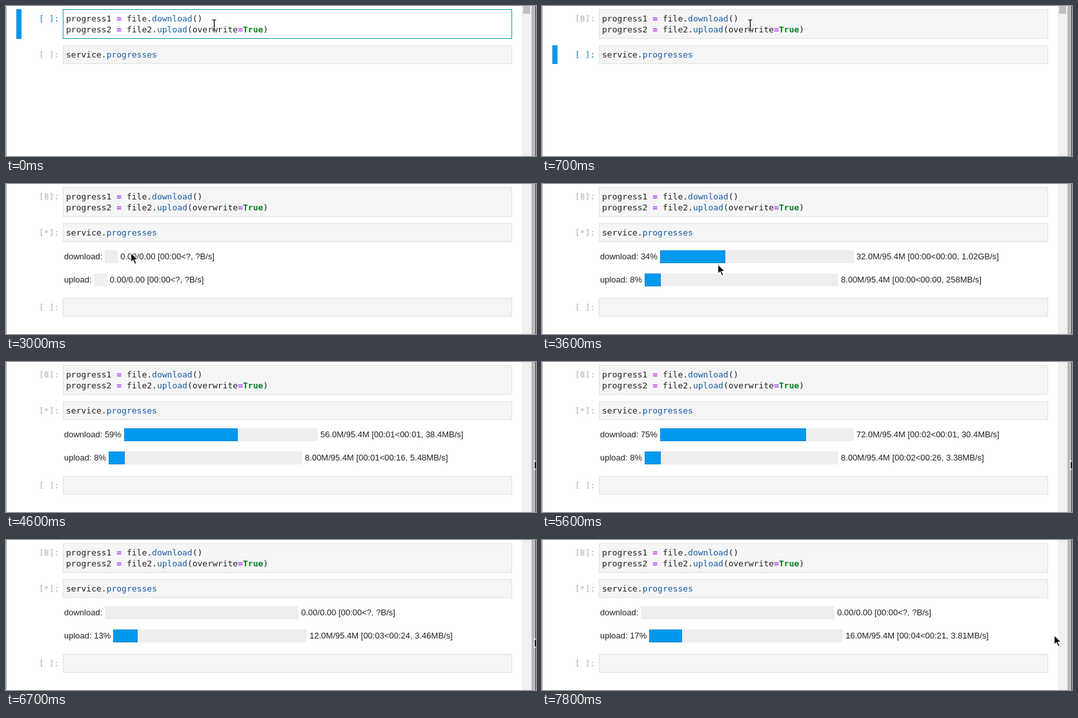
An HTML page for the animation above (8000 ms loop, 821 px wide and 233 px high).

```html
<!DOCTYPE html>
<html lang="en">
<head>
<meta charset="utf-8">
<title>Notebook progress bars</title>
<style>
  html, body { margin: 0; width: 100%; height: 100%; overflow: hidden; background: #fff; }
  #stage { position: relative; width: 821px; height: 233px; overflow: hidden; background: #fff; }
  #stage > * { position: absolute; box-sizing: border-box; }
  .edge { left: 0; top: 0; width: 1px; height: 233px; background: #a9a9a9; }
  .track { left: 799px; top: 0; width: 15px; height: 233px; background: #f0f0f0; }
  .thumb { left: 801px; top: 0; width: 11px; height: 12px; background: #c1c1c1; }
  .gutter { left: 814px; top: 0; width: 7px; height: 233px; background: #b9b9b9; border-right: 1px solid #3c3c3c; }
  .mark { left: 16px; width: 8px; background: #0399ea; border: 1px solid #0690dc; }
  .code, .prompt { font: 13px/17px "DejaVu Sans Mono", monospace; white-space: pre; color: #212121; }
  .code { left: 88px; width: 696px; padding: 5px 4px; border: 1px solid #e0e0e0; background: #f5f5f5; }
  .code.edit { background: #fff; border-color: #0e97b0; }
  .prompt { left: 51px; color: #b0b0b0; }
  .prompt.active { color: #2583ae; }
  .code b { color: #aa22ff; }
  .code b.k { color: #067c20; }
  .code i { font-style: normal; color: #155ba2; }
  .caret { left: 265px; top: 28px; width: 1px; height: 17px; background: #000; }
  .row { left: 90px; display: flex; gap: 4px; height: 20px; white-space: pre;
         font: 13px/20px "Liberation Sans", Arial, sans-serif; color: #212121; }
  .bar { flex: none; height: 20px; background: #eee; }
  .fill { height: 20px; background: #0099ee; box-shadow: inset 0 0 0 1px #0a88d6; }
  svg { left: 0; top: 0; overflow: visible; }
</style>
</head>
<body>
<div id="stage">
  <div class="edge"></div>
  <div class="track"></div>
  <div class="thumb" id="thumb"></div>
  <div class="gutter"></div>
  <div class="mark" id="mark"></div>

  <div class="prompt" id="p1" style="top:11px"></div>
  <div class="code" id="c1" style="top:5px;height:46px">progress1 <b>=</b> file.<i>download</i>()
progress2 <b>=</b> file2.<i>upload</i>(overwrite<b>=</b><b class="k">True</b>)</div>
  <div class="prompt" id="p2" style="top:67px"></div>
  <div class="code" style="top:61px;height:29px">service.<i>progresses</i></div>
  <div class="prompt" id="p3">[ ]:</div>
  <div class="code" id="c3" style="height:29px"></div>
  <div class="caret" id="caret"></div>

  <div class="row" id="down" style="top:103px"><span></span><div class="bar"><div class="fill"></div></div><span></span></div>
  <div class="row" id="up" style="top:139px"><span></span><div class="bar"><div class="fill"></div></div><span></span></div>

  <svg id="beam" width="11" height="21" fill="none">
    <path d="M2.5 2.5h2l1 1 1-1h2M5.5 3v15M2.5 18.5h2l1-1 1 1h2" stroke="#fff" stroke-width="2.4"/>
    <path d="M2.5 2.5h2l1 1 1-1h2M5.5 3v15M2.5 18.5h2l1-1 1 1h2" stroke="#000" stroke-width="1.2"/>
  </svg>
  <svg id="arrow" width="13" height="20">
    <path d="M.5 .8V15.6L4 12.4l2.6 6 2.5-1.1-2.6-5.8h4.9Z" fill="#111" stroke="#fff" stroke-width="1.1"/>
  </svg>
</div>
<script>
const LOOP = 8000, STEP = 100, TOTAL = 95.367, BAR = 300, CHUNK = 4;
const START = 3200, DONE = 6700;
const $ = id => document.getElementById(id);

// key points: time, then values
const received = [[3500, 32], [4400, 52], [4600, 56], [5300, 64], [6000, 84], [6500, 88]];
const elapsed = [[START, 0.0307], [4600, 1.459], [6000, 2.734], [7400, 4.2]];
const pointer = [
  [2700, 318, 28], [3000, 193, 106], [3600, 272, 124], [4400, 704, 136],
  [4600, 818, 152], [7100, 818, 152], [7600, 802, 150], [7800, 793, 147]
];

// linear interpolation of column n, held at both ends
function at(keys, t, n = 1) {
  const i = keys.findIndex(k => k[0] > t);
  if (i < 0) return keys[keys.length - 1][n];
  if (i === 0) return keys[0][n];
  const a = keys[i - 1], b = keys[i];
  return a[n] + (b[n] - a[n]) * (t - a[0]) / (b[0] - a[0]);
}

// data arrives in whole chunks
function downloaded(t) {
  if (t < START || t >= DONE) return 0;
  return Math.floor(at(received, t) / CHUNK) * CHUNK;
}
function uploaded(t) {
  return t < START ? 0 : t < 6000 ? 8 : t < 7400 ? 12 : 16;
}

// the readout refreshes only when a chunk arrives
function refreshed(t) {
  const state = s => downloaded(s) + "/" + uploaded(s);
  let s = t;
  while (s > START && state(s - STEP) === state(t)) s -= STEP;
  return s;
}

function size(v) {
  return v < 9.995 ? v.toFixed(2) : v < 99.95 ? v.toFixed(1) : v.toFixed(0);
}
function rate(v) {
  return v >= 999.5 ? size(v / 1024) + "GB/s" : size(v) + "MB/s";
}
function clock(s) {
  return "00:" + String(s).padStart(2, "0");
}

function showRow(id, name, done, secs, width, filled = done) {
  const [label, bar, info] = $(id).children;
  const speed = done / secs;
  label.textContent = name + ":" + (done ? " " + Math.round(100 * done / TOTAL) + "%" : "");
  bar.style.width = width + "px";
  bar.firstChild.style.width = width * filled / TOTAL + "px";
  info.textContent = done
    ? `${size(done)}M/95.4M [${clock(Math.floor(secs))}<${clock(Math.round((TOTAL - done) / speed))}, ${rate(speed)}]`
    : "0.00/0.00 [00:00<?, ?B/s]";
}

function drawProgress(t) {
  const down = downloaded(t);
  const secs = at(elapsed, refreshed(t));
  const width = t < START ? 20 : BAR;
  // the last chunk fills the bar just before its text appears
  const filled = t >= 6300 && down ? 88 : down;
  showRow("down", "download", down, secs, width, filled);
  showRow("up", "upload", uploaded(t), secs + 0.0003, width);
}

function show(id, on) {
  $(id).style.visibility = on ? "visible" : "hidden";
}
function move(id, x, y) {
  $(id).style.transform = `translate(${x}px, ${y}px)`;
}

function drawPointer(t) {
  const moving = t >= 2700;
  const x = moving ? Math.round(at(pointer, t, 1)) : 322;
  const y = moving ? Math.round(at(pointer, t, 2)) : 29;
  const overCode = y < 51;
  show("beam", overCode && (moving || t < 2300));
  show("arrow", !overCode);
  move("beam", x - 5, y - 10);
  move("arrow", x, y);
}

function setPrompt(id, text, active) {
  $(id).textContent = `[${text}]:`;
  $(id).classList.toggle("active", active);
}

function draw(time) {
  const t = Math.floor(time / STEP) * STEP;
  const first = t < 700, ran = t >= 1900, busy = t >= 2100;

  $("c1").classList.toggle("edit", first);
  setPrompt("p1", first ? " " : "8", first);
  setPrompt("p2", ran ? "*" : " ", !first && !ran);
  show("caret", t >= 100 && first);
  show("thumb", !ran);
  show("mark", !ran);
  $("mark").style.top = first ? "5px" : "61px";
  $("mark").style.height = first ? "46px" : "29px";

  const top = busy ? 177 : 100;
  $("c3").style.top = top + "px";
  $("p3").style.top = top + 6 + "px";
  show("c3", ran);
  show("p3", ran);

  show("down", busy);
  show("up", busy);
  if (busy) drawProgress(t);
  drawPointer(t);
}

const begin = performance.now();
function tick() {
  draw((performance.now() - begin) % LOOP);
  requestAnimationFrame(tick);
}
draw(0);
requestAnimationFrame(tick);
</script>
</body>
</html>
```
